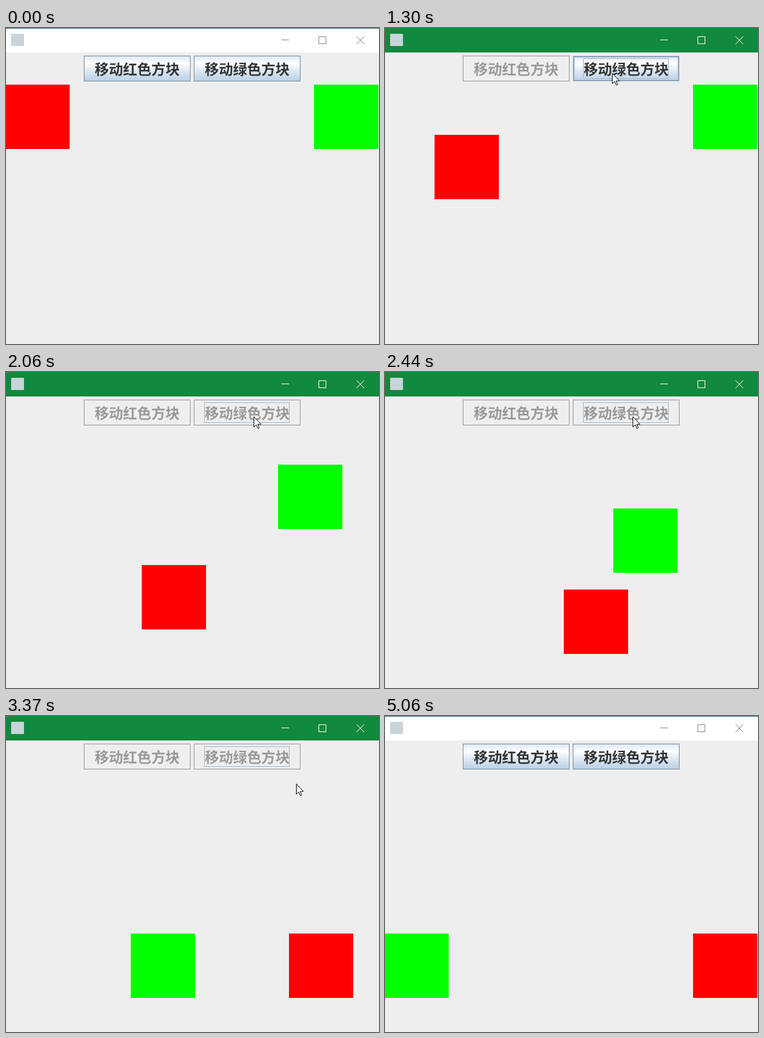
Animation, 580 px wide and 491 px high, one loop 5310 ms. Source, as an HTML page:

```html
<!DOCTYPE html>
<html lang="zh-CN">
<head>
<meta charset="utf-8">
<style>
html, body { margin: 0; width: 100%; height: 100%; overflow: hidden; background: #eee; }
svg { display: block; }
text { font: bold 22px "Noto Sans CJK SC", "Noto Sans CJK", "Noto Sans CJK JP", sans-serif; fill: #333; }
.face { fill: url(#ocean); stroke: #7a8a99; }
.rim, .ring { fill: none; visibility: hidden; }
.rim { stroke: #b8cfe5; }
.edge { stroke: #7a8a99; }
.ring { stroke: #a3b8cc; }
.focus .ring, .hover .rim { visibility: visible; }
.pressed .face { fill: #b8cfe5; }
.off .face { fill: #eee; stroke: #999; }
.off text { fill: #999; }
#bar { fill: #fff; }
#line { fill: #2b6a68; }
#controls { fill: none; stroke: #7a9098; }
.active #bar { fill: #11893e; }
.active #line { fill: #268a4e; }
.active #controls { stroke: #fff; }
</style>
</head>
<body>
<svg id="stage" width="580" height="491" viewBox="0 0 580 491">
  <defs>
    <linearGradient id="ocean" x2="0" y2="1">
      <stop stop-color="#dde8f3"/>
      <stop offset=".3" stop-color="#fff"/>
      <stop offset=".6" stop-color="#dde8f3"/>
      <stop offset="1" stop-color="#b8cfe5"/>
    </linearGradient>
  </defs>
  <rect width="580" height="491" fill="#eee"/>
  <rect id="bar" width="580" height="38"/>
  <rect id="line" width="580" height="1"/>
  <rect x="8" y="9" width="20" height="19" rx="1" fill="#c9d3da"/>
  <g id="controls">
    <path d="M428 18.5h12M486.5 13.5h11v11h-11z"/>
    <path d="M545 13l12 12M557 13l-12 12"/>
  </g>
  <g id="buttons"></g>
  <rect id="red" width="100" height="100" fill="#f00"/>
  <rect id="green" width="100" height="100" fill="#0f0"/>
  <path id="cursor" d="M.5 .5V16.5L4.2 13L6.8 18.8L8.9 17.9L6.4 12.2H11.5Z" fill="#fff" stroke="#111"/>
</svg>
<script>
// All times below are counted in screen refreshes of STEP ms
const LOOP = 5310, STEP = 76;
const SPEED = 13.42, TRAVEL = 480, DROP = 250;
const RED_START = 11.137, GREEN_START = 22.754;
const $ = id => document.getElementById(id);

// Cursor stops: time, x, y
const stops = [[0, 490, 530], [8, 255, 78], [9, 255, 66], [12, 255, 66], [17, 353, 70],
  [21, 385, 69], [39, 385, 69], [44, 451, 105], [50, 580, 500]];

function cursorAt(k) {
  const i = stops.findIndex(s => s[0] > k);
  if (i < 0) return [580, 500];
  const [t0, x0, y0] = stops[i - 1], [t1, x1, y1] = stops[i];
  const u = (k - t0) / (t1 - t0);
  return [Math.round(x0 + (x1 - x0) * u), Math.round(y0 + (y1 - y0) * u)];
}

// Distance covered: constant speed from the launch to the far side
const distance = (k, launch) => Math.floor(Math.min(TRAVEL, Math.max(0, (k - launch) * SPEED)));

const box = (name, inset) => `<rect class="${name}" x="${inset + .5}" y="${inset + .5}"
  width="${165 - 2 * inset}" height="${39 - 2 * inset}"/>`;

function addButton(x, label) {
  $('buttons').insertAdjacentHTML('beforeend', `<g transform="translate(${x} 43)">
    ${box('face', 0)}${box('rim', 0)}${box('rim', 2)}${box('rim edge', 1)}
    <text x="17" y="29">${label}</text>
    <rect class="ring" x="16.5" y="4.5" width="132" height="31"/></g>`);
  return { x, node: $('buttons').lastElementChild };
}
const redButton = addButton(121, '移动红色方块');
const greenButton = addButton(292, '移动绿色方块');

function setButton({ x, node }, moved, [cx, cy], focus, pressed) {
  const off = moved > 0 && moved < TRAVEL;
  const inside = cx >= x && cx < x + 166 && cy >= 43 && cy < 83;
  const states = { off, focus, pressed, hover: inside && !off && !pressed };
  node.setAttribute('class', Object.keys(states).filter(s => states[s]).join(' '));
}

function place(id, x, moved) {
  $(id).setAttribute('x', x);
  $(id).setAttribute('y', 88 + Math.min(moved, DROP));
}

function draw(ms) {
  const k = Math.floor(ms % LOOP / STEP);
  const within = (a, b) => k >= a && k < b;
  const red = distance(k, RED_START), green = distance(k, GREEN_START), tip = cursorAt(k);

  $('stage').setAttribute('class', within(9, 66) ? 'active' : '');
  setButton(redButton, red, tip, within(9, 12), within(10, 12));
  setButton(greenButton, green, tip, within(12, 66), within(22, 23));
  place('red', red - 1, red);
  place('green', TRAVEL - 1 - green, green);
  $('cursor').setAttribute('transform', `translate(${tip})`);
}

let start;
function loop(now) {
  start ??= now;
  draw(now - start);
  requestAnimationFrame(loop);
}
draw(0);
requestAnimationFrame(loop);
</script>
</body>
</html>
```
